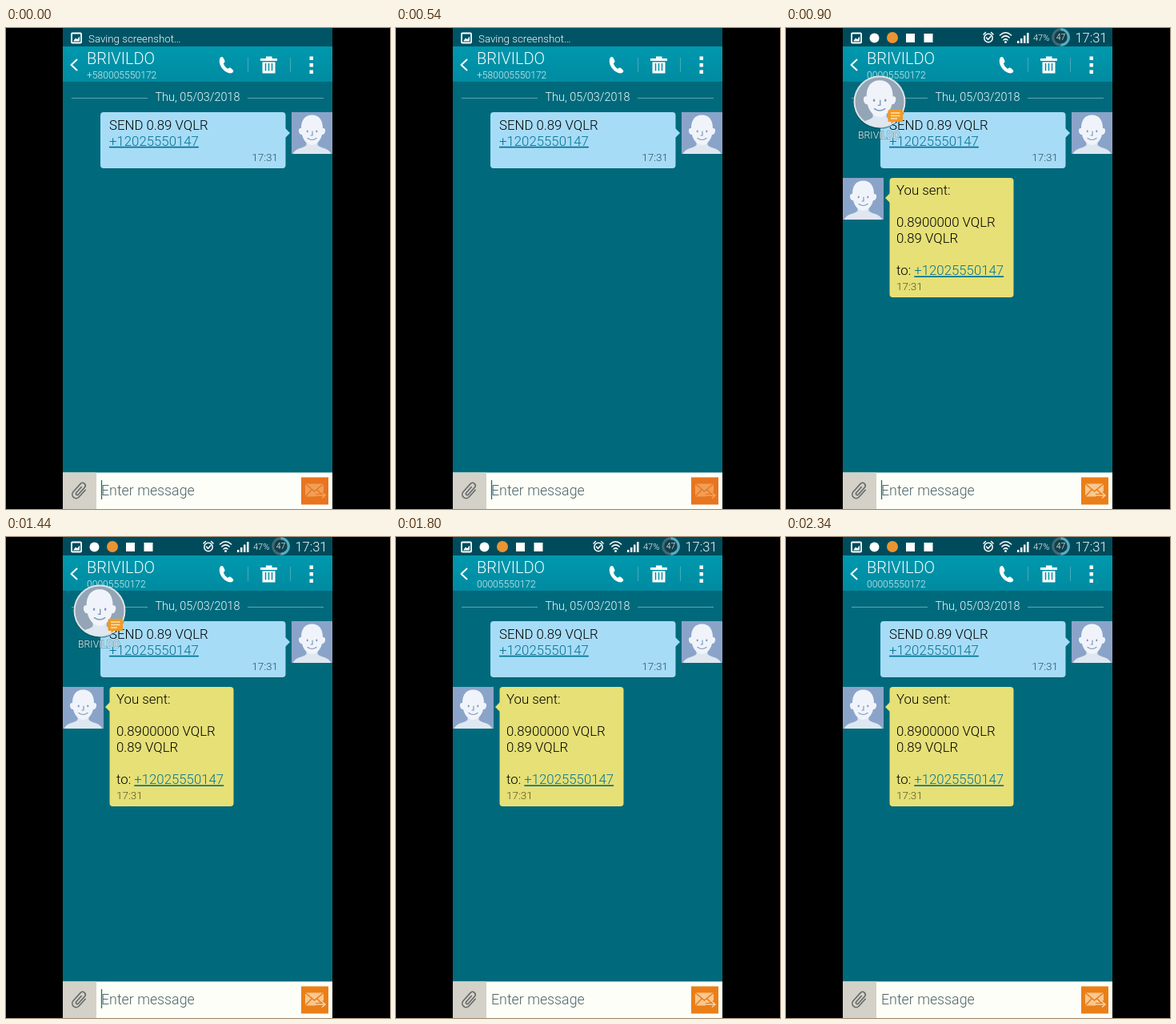
Write an HTML page that moves like this. It is 480 px wide and 600 px high and loops after 2.7 s.

```html
<!DOCTYPE html>
<html lang="en">
<head>
<meta charset="utf-8">
<title>Message thread</title>
<style>
  html, body { margin: 0; width: 100%; height: 100%; overflow: hidden; background: #000; }
  svg { display: block; width: 480px; height: 600px; }
  text { font-family: Roboto, sans-serif; font-weight: 300; white-space: pre; }
  .msg { font-size: 16.8px; fill: #000; }
  .link { fill: #007391; text-decoration: underline; text-decoration-thickness: 1px; }
  .time { font-size: 13.5px; }
  .white { fill: #f4fcfd; }
  .sub { font-size: 12.1px; fill: #d9f1f4; }
  .line { fill: none; stroke: #fff; stroke-linecap: round; stroke-linejoin: round; }
</style>
</head>
<body>
<svg viewBox="0 0 480 600">
  <defs>
    <linearGradient id="bar" x2="0" y2="1">
      <stop offset="0" stop-color="#0098ae"/>
      <stop offset="1" stop-color="#008ba1"/>
    </linearGradient>
    <clipPath id="tile"><path d="M0 0H51V52H0z"/></clipPath>
    <clipPath id="disc"><circle cx="117" cy="92" r="31"/></clipPath>
    <g id="person">
      <path d="M18.500 33V41C16 45 5 44 1.500 52H49.500C46 44 35 45 32.500 41V33z" fill="#dfe7f1"/>
      <path d="M25.500 3.500C34.500 3.500 39 10 39 20Q42.500 19.500 42 24Q41 28.500 38 28C36.500 35 31 41 25.500 41S14.500 35 13 28Q10 28.500 9 24Q8.500 19.500 12 20C12 10 16.500 3.500 25.500 3.500z" fill="#f0f4fa"/>
      <g fill="none" stroke="#7f98bb" stroke-width="1.200" stroke-linecap="round">
        <path d="M26 24V29H24M20 32.500Q25.500 36.500 31 32.500"/>
        <path d="M19.700 23.500V24.300M31.300 23.500V24.300" stroke-width="2"/>
      </g>
    </g>
    <g id="avatar" clip-path="url(#tile)">
      <path d="M0 0H51V52H0z" fill="#8aa4c9"/>
      <use href="#person"/>
    </g>
  </defs>

  <path d="M0 0H480V600H0z"/>
  <path d="M71 0H408V600H71z" fill="#006a7c"/>
  <path d="M71 0H408V23H71z" fill="#005465"/>
  <path data-show="011" d="M71 0H408V23H71z" fill="#004b5b"/>
  <path d="M71 23H408V67H71z" fill="url(#bar)"/>

  <!-- status bar -->
  <g>
    <rect x="82" y="6.500" width="12" height="12" rx="1" class="line" stroke-width="1.800"/>
    <path d="M84 16.500L87 12.500L89 14.200L92 10.500V16.500z" fill="#fff"/>
  </g>
  <text data-show="100" class="white" x="103" y="17.500" font-size="13.300">Saving screenshot…</text>
  <g data-show="011">
    <circle cx="110.500" cy="12.500" r="6" fill="#fff"/>
    <circle cx="133" cy="12" r="7" fill="#eb9433"/>
    <path d="M150 7H161V18H150zM172.500 7H183.500V18H172.500z" fill="#fff"/>
    <g class="line" stroke-width="1.500">
      <circle cx="253" cy="12.500" r="5.200"/>
      <path d="M247 8L249.500 5.500M259 8L256.500 5.500M250.500 12L252.500 14.500L256 10.500"/>
      <path d="M267.500 9Q274.500 2.500 281.500 9M269.800 12Q274.500 7.800 279.200 12M272 15Q274.500 12.800 277 15"/>
    </g>
    <circle cx="274.500" cy="17.500" r="1.500" fill="#fff"/>
    <path d="M289 19V16H291.500V19zM293 19V13H295.500V19zM297 19V9.500H299.500V19zM301 19V6H303.500V19z" fill="#fff"/>
    <text class="white" x="309" y="16" font-size="11">47%</text>
    <circle cx="343.500" cy="11.500" r="9.800" fill="#123f4a" stroke="#3f6a74" stroke-width="3"/>
    <path d="M343.500 1.700A9.800 9.800 0 0 1 343.500 21.300" fill="none" stroke="#4fb0c4" stroke-width="3"/>
    <text class="white" x="343.500" y="15.300" font-size="10.500" text-anchor="middle">47</text>
    <text class="white" x="401.500" y="17.500" font-size="16.500" text-anchor="end">17:31</text>
  </g>

  <!-- header -->
  <path class="line" d="M88.500 39.500L81.500 46L88.500 52.500" stroke-width="2"/>
  <text class="white" x="101" y="45" font-size="20">BRIVILDO</text>
  <text data-show="100" class="sub" x="101" y="63">+580005550172</text>
  <text data-show="011" class="sub" x="101" y="63">00005550172</text>
  <path d="M267.500 37.500Q269.500 35 271.500 37L273.500 41Q274 43 271.800 44.300Q273 48.500 277 51Q278.800 48.800 280.800 49.800L284 52.800Q285 54.800 282 56.300C274 57.500 264 46 267.500 37.500z" fill="#fff"/>
  <path d="M302.500 37V55M355.500 37V55" stroke="#45aaba"/>
  <g fill="#fff">
    <path d="M318 38H325V35.500H332.500V38H339V41H318zM320.500 42.500H336.500V56.500H320.500z"/>
    <path d="M379.500 35.500H384V40H379.500zM379.500 44H384V48.500H379.500zM379.500 52.500H384V57H379.500z"/>
  </g>
  <path d="M324.500 44V53.500M328.500 44V53.500M332.500 44V53.500" stroke="#008fa5" stroke-width="1.500"/>

  <!-- thread -->
  <path d="M82 87.500H177M302 87.500H397" stroke="#61a5b0"/>
  <text class="white" x="239.500" y="91" font-size="14.400" text-anchor="middle">Thu, 05/03/2018</text>

  <rect x="118" y="105.500" width="231.500" height="70" rx="4" fill="#005b6b"/>
  <rect x="118" y="105" width="231.500" height="70" rx="4" fill="#a7dcf7"/>
  <path d="M349 125L355 131L349 137z" fill="#a7dcf7"/>
  <text class="msg" x="129" y="126.800">SEND 0.89 VQLR</text>
  <text class="msg link" x="129" y="146.800">+12025550147</text>
  <text class="time" x="340" y="165.500" text-anchor="end" fill="#2f4f5d">17:31</text>
  <use href="#avatar" x="357" y="105"/>

  <g data-show="011">
    <rect x="129.500" y="187.500" width="155" height="149" rx="4" fill="#005b6b"/>
    <rect x="129.500" y="187" width="155" height="149" rx="4" fill="#e6e077"/>
    <path d="M130 206L124 212L130 218z" fill="#e6e077"/>
    <text class="msg" x="138" y="208.300">You sent:</text>
    <text class="msg" x="138" y="248.300">0.8900000 VQLR</text>
    <text class="msg" x="138" y="268.300">0.89 VQLR</text>
    <text class="msg" x="138" y="308.300">to: <tspan class="link">+12025550147</tspan></text>
    <text class="time" x="138" y="327" fill="#525228">17:31</text>
    <use href="#avatar" x="71" y="187"/>
  </g>

  <!-- floating contact -->
  <g data-show="010">
    <circle cx="117" cy="93" r="33" fill="#003d49" opacity=".45"/>
    <circle cx="117" cy="92" r="32.500" fill="#dfe4e7"/>
    <circle cx="117" cy="92" r="30.500" fill="#93a5b6"/>
    <g clip-path="url(#disc)">
      <use href="#person" transform="translate(86 61) scale(1.220)"/>
    </g>
    <path d="M129 102H144.500Q146 102 146 103.500V115.500Q146 117 144.500 117H135L131.500 119.500V117H129Q127.500 117 127.500 115.500V103.500Q127.500 102 129 102z" fill="#f29a22"/>
    <path d="M131 106H142.500M131 109.500H142.500M131 113H139" stroke="#ffe3b4" stroke-width="1.300"/>
    <text class="white" x="90" y="138" font-size="12.300" stroke="#00313c" stroke-opacity=".25" stroke-width="2" paint-order="stroke">BRIVILDO</text>
  </g>

  <!-- composer -->
  <path d="M71 554.500H408V600H71z" fill="#fdfef7"/>
  <path d="M71 554.500H113V600H71z" fill="#d4d2c8"/>
  <path transform="translate(92 577) rotate(42) scale(1.080)" d="M4.500 -5V6A4.500 4.500 0 0 1 -4.500 6V-7A3.300 3.300 0 0 1 2 -7V4.500A1.600 1.600 0 0 1 -1.200 4.500V-4.500" fill="none" stroke="#66696a" stroke-width="1.500" stroke-linecap="round"/>
  <text x="119" y="583" font-size="17.800" fill="#4e6468">Enter message</text>
  <path data-show="110" d="M119.500 564V588" stroke="#137389" stroke-width="1.300"/>
  <path data-show="100" d="M369 560.500H403V594.500H369z" fill="#e8751f"/>
  <path data-show="011" d="M369 560.500H403V594.500H369z" fill="#eb7f17"/>
  <g id="mail" fill="none" stroke-width="1.500">
    <path d="M374 568.500H397V584.500H374z" fill="#f9c78f" stroke="none"/>
    <path d="M374 568.500L385.500 578L397 568.500M374 584.500L382 576M397 584.500L389 576" stroke="#e87c1b"/>
    <path d="M387 583H398M395 579.500L399 583L395 586.500" stroke="#e87c1b" stroke-width="4"/>
    <path d="M387 583H398M395 579.500L399 583L395 586.500" stroke="#fbd3a4"/>
  </g>
</svg>
<script>
  const HOLD = 900;
  const STEPS = 3;

  // Holds each value for one step, then jumps to the next.
  function hold(el, prop, values) {
    const frames = values.map((v, i) => ({ [prop]: v, offset: i / STEPS, easing: "steps(1, end)" }));
    frames.push({ [prop]: values[STEPS - 1], offset: 1 });
    el.animate(frames, { duration: HOLD * STEPS, iterations: Infinity });
  }

  for (const el of document.querySelectorAll("[data-show]")) {
    hold(el, "opacity", [...el.dataset.show].map(Number));
  }
  hold(document.getElementById("mail"), "opacity", [0.5, 1, 1]);
</script>
</body>
</html>
```
